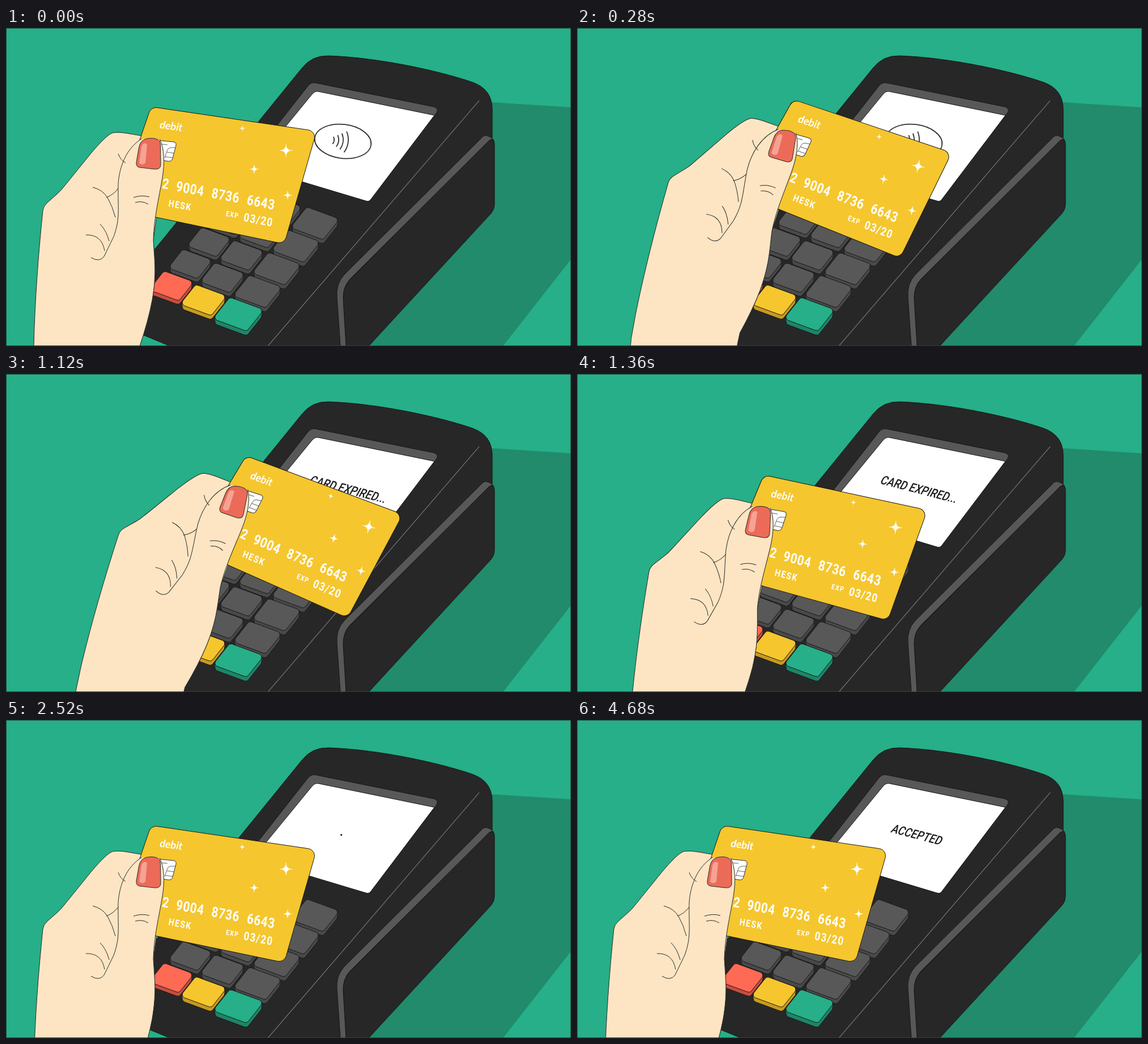
Animation, 997 px wide and 561 px high, one loop 5.44 s. Source, as an HTML page with a canvas:

```html
<!DOCTYPE html>
<html lang="en">
<head>
<meta charset="utf-8">
<title>Card payment</title>
<style>
  html, body { margin: 0; width: 100%; height: 100%; overflow: hidden; background: #26af88; }
  canvas { display: block; width: 997px; height: 561px; }
</style>
</head>
<body>
<canvas id="stage" width="997" height="561"></canvas>
<script>
const ctx = document.getElementById('stage').getContext('2d');
const LOOP = 5440, STEP = 40;
const INK = '#171717', SKIN = '#fde5c3', GOLD = '#f5c62e', GREEN = '#26af88', GREY = '#585858', BODY = '#272727';

const clamp = v => Math.max(0, Math.min(1, v));
const shape = d => new Path2D(d);

function paint(path, fill, stroke, width = 1) {
  if (fill) { ctx.fillStyle = fill; ctx.fill(path); }
  if (stroke) { ctx.strokeStyle = stroke; ctx.lineWidth = width; ctx.stroke(path); }
}

function roundPoly(points, r) {
  const p = new Path2D(), n = points.length, last = points[n - 1];
  p.moveTo((last[0] + points[0][0]) / 2, (last[1] + points[0][1]) / 2);
  points.forEach(([x, y], i) => p.arcTo(x, y, ...points[(i + 1) % n], r));
  p.closePath();
  return p;
}

// Text on a tilted plane; axes holds the across and down vectors.
function planeText(text, x, y, font, axes, color, spacing = 0) {
  ctx.save();
  ctx.transform(...axes, x, y);
  ctx.font = font;
  ctx.letterSpacing = spacing + 'px';
  ctx.fillStyle = color;
  ctx.fillText(text, 0, 0);
  ctx.restore();
}

// ---- terminal ----
const shadow = shape('M858 131 L997 140 V408 L877 561 H630 Z');
const body = shape('M160 505 L262 391 L522 71 Q540 48 569 49 C660 52 770 77 824 96 Q857 108 858 142 V320 L640 561 H289 L243 542 Z');
const side = shape('M853 198 Q862 194 862 205 V311 Q862 320 856 327 L640 561 H600 L595 478 Q594 458 607 444 Z');
const rail = shape('M842 191 L597 435 Q582 451 584 475 L590 561 H600 L595 478 Q594 457 607 443 L853 198 Q858 195 861 198 Q855 191 849 190 Q846 189 842 191 Z');
const edge = shape('M835 128 L462 561');
const bezel = shape('M420 246 L533 102 Q539 95 547 97 L755 139 Q764 142 760 149 L756 155 L640 300 Z');
const screen = shape('M435 245 L540 117 Q545 111 551 112 L756 154 L644 302 Q641 307 635 305 Z');

function drawKey(row, col) {
  const special = [['#ff6a55', '#c94d3e'], ['#f5c62e', '#c79a20'], [GREEN, '#1d8568']];
  const [face, flank] = row ? [GREY, '#494949'] : special[col];
  const x = [292, 348.5, 410][col] + row * (33.2 + col * 0.3);
  const y = 455 + col * 25 - row * (38.7 + col * 0.7);
  const s = row ? [0.87, 0.89, 0.965][col] : [0.88, 0.915, 1][col];
  const key = dy => roundPoly([[-15, -30], [45, -8], [15, 30], [-45, 8]].map(([a, b]) => [x + a * s, y + b * s + dy]), 6);
  paint(key(8 * s), flank, INK);
  paint(key(4 * s), flank);
  paint(key(0), face, INK);
}

function drawTerminal() {
  ctx.fillStyle = GREEN;
  ctx.fillRect(0, 0, 997, 561);
  paint(shadow, '#218b6c');
  paint(body, BODY, INK);
  paint(side, BODY, INK);
  paint(rail, GREY, INK);
  paint(edge, null, '#858585', 1.1);
  paint(bezel, GREY, INK);
  paint(screen, '#fff', INK);
  for (let row = 4; row >= 0; row--)
    for (let col = 0; col < 3; col++) drawKey(row, col);
}

// ---- screen content ----
const DOT_TIMES = [2520, 2720, 2920, 3120, 3280, 3480, 3680, 3880, 4040, 4240, 4440];
const fadeIn = (t, at) => t < at ? 0 : clamp((t - at) / 120 + 1 / 3);

function drawContactless() {
  const oval = new Path2D();
  oval.ellipse(594.5, 200, 50, 30, 0.12, 0, 7);
  paint(oval, null, '#303030', 1.8);
  ctx.lineCap = 'round';
  for (const r of [12, 20, 28, 37]) {
    const wave = new Path2D();
    wave.arc(567, 197, r, -0.38, 0.63);
    paint(wave, null, '#303030', 1.8);
  }
  ctx.lineCap = 'butt';
}

function screenText(text, x, y, alpha) {
  ctx.globalAlpha = alpha;
  planeText(text, x, y, '500 18.3px Roboto, sans-serif', [0.965, 0.25, -0.6, 1.08], '#1c1c1c');
  ctx.globalAlpha = 1;
}

function drawScreen(t) {
  if (t < 2520) {
    const k = fadeIn(t, 800);
    ctx.globalAlpha = 1 - k;
    drawContactless();
    screenText('CARD EXPIRED...', 533.5, 193, k);
  } else if (t < 4600) {
    const step = DOT_TIMES.filter(at => at <= t).length - 1;
    for (let i = 0; i <= step % 3; i++) {
      const dot = new Path2D();
      dot.arc(591.7 + i * 5, 202.7 + i * 1.2, 1.6, 0, 7);
      paint(dot, '#1c1c1c');
    }
  } else {
    screenText('ACCEPTED', 552.5, 197.8, fadeIn(t, 4600));
  }
}

// ---- hand and card ----
const hand = shape('M56 680 L49 605 V561 C51 480 57 400 65 322 Q66 314 73 308 L90 293 Q97 287 103 279 L150 221 Q177 189 188 185 Q197 183 215 186 L250 192 L266 330 L260 374 C262 410 266 432 258 480 Q251 517 236 561 L232 680 Z');
const thumb = shape('M240 195 C212 212 200 245 198 275 C197 320 202 335 190 368 L173 408 L180 680 H232 L236 561 Q251 517 258 480 C266 432 262 410 260 374 C261 335 270 300 276 264 C280 240 280 213 271 196 Z');
const thumbLeft = shape('M240 195 C212 212 200 245 198 275 C197 320 202 335 190 368 L173 403 Q165 414 150 405');
const thumbRight = shape('M271 196 C280 213 280 240 276 264 C270 300 261 335 260 374 C262 410 266 432 258 480 Q251 517 236 561 L232 680');
const creases = shape('M198 222 Q202 233 211 238 M153 281 Q170 285 179 299 Q188 315 193 334 M177 299 Q190 294 198 283 M141 365 Q169 364 174 393 M166 346 Q177 357 182 376 M225 299 Q239 294 253 298 M228 308 Q240 304 251 311');
const nail = shape('M234.5 211 Q237 198 247 195.5 Q261 192.5 269 197.5 Q273 201 272.5 210 L273 241 Q273 250 262 249 L236 246 Q229 245 230 237 Z');
const shine = shape('M239 209 Q243 200 249 205 L246 238 Q240 244 235 238 Z');
const card = roundPoly([[256, 139], [548, 182], [491, 381], [222, 325], [218, 250]], 13);
const chip = shape('M266 198 L296 201 Q301 202 300 207 L294 230 Q292 236 286 235 L266 232 Z');
const chipLines = shape('M299 211 H290 Q285 212 284 217 L280 229 M297 221 L284 219 M275 205 L285 206 M294 229 L281 227');

function sparkle(x, y, r) {
  const p = new Path2D();
  p.moveTo(x, y - r);
  for (const [dx, dy] of [[r, 0], [0, r], [-r, 0], [0, -r]])
    p.quadraticCurveTo(x, y, x + dx, y + dy);
  paint(p, '#fff', '#fff', 0.4);
}

function cardText(text, x, y, size, spacing) {
  planeText(text, x, y, `bold ${size}px Roboto, sans-serif`, [0.98, 0.19, -0.2, 1.2], '#fff', spacing);
}

function drawCard() {
  paint(card, GOLD, INK);
  paint(chip, '#fff', '#333');
  paint(chipLines, null, '#555', 0.9);
  planeText('debit', 270, 176.5, 'bold 17.5px Lato, sans-serif', [0.99, 0.14, -0.25, 1.04], '#fff');
  cardText('2', 274.5, 282.3, 20.5, 0.8);
  ['9004', '8736', '6643'].forEach((group, i) => cardText(group, 299 + i * 62.5, 287.3 + i * 12, 20.5, 0.8));
  cardText('HESK', 286, 314.5, 14, 1.6);
  cardText('EXP', 387.5, 331.5, 10.5, 1.3);
  cardText('03/20', 418.5, 340.5, 17, 1.5);
  sparkle(494, 216, 11.5);
  sparkle(438, 249, 7.5);
  sparkle(417, 177, 4.5);
  sparkle(497, 295, 7.5);
}

function drawHand(pose) {
  ctx.save();
  ctx.translate(pose.x, pose.y);
  ctx.rotate(pose.turn * Math.PI / 180);
  ctx.translate(-494, -216);
  paint(hand, SKIN, '#2b2b2b');
  drawCard();
  paint(thumb, SKIN);
  for (const line of [thumbLeft, thumbRight, creases]) paint(line, null, '#2b2b2b');
  paint(nail, '#eb6b58', '#2b2b2b');
  paint(shine, '#f5a394');
  ctx.restore();
}

// ---- motion ----
const TAP_TURN = 13;
const ramp = (t, k) => 3 * t * t * (1 - t) * k + t * t * t;
const quad = (s, a, b, c) => (1 - s) ** 2 * a + 2 * s * (1 - s) * b + s * s * c;
const cubic = (s, a, b, c, d) => (1 - s) * quad(s, a, b, c) + s * quad(s, b, c, d);

function poseAt(t) {
  if (t <= 1040) {
    const s = ramp(clamp(t / 360), 0.767);
    return { x: quad(s, 494, 559, 635), y: quad(s, 216, 217.5, 261), turn: TAP_TURN * s };
  }
  const s = ramp(clamp((t - 1040) / 480), 0.94);
  return { x: cubic(s, 635, 669, 572, 494), y: cubic(s, 261, 308, 262.4, 263), turn: TAP_TURN * (1 - s) };
}

const start = performance.now();

function draw() {
  const t = Math.floor((performance.now() - start) % LOOP / STEP) * STEP;
  drawTerminal();
  drawScreen(t);
  drawHand(poseAt(t));
  ctx.strokeStyle = '#1d4a3d';
  ctx.lineWidth = 1;
  ctx.strokeRect(0.5, 0.5, 996, 560);
  requestAnimationFrame(draw);
}
draw();
</script>
</body>
</html>
```
